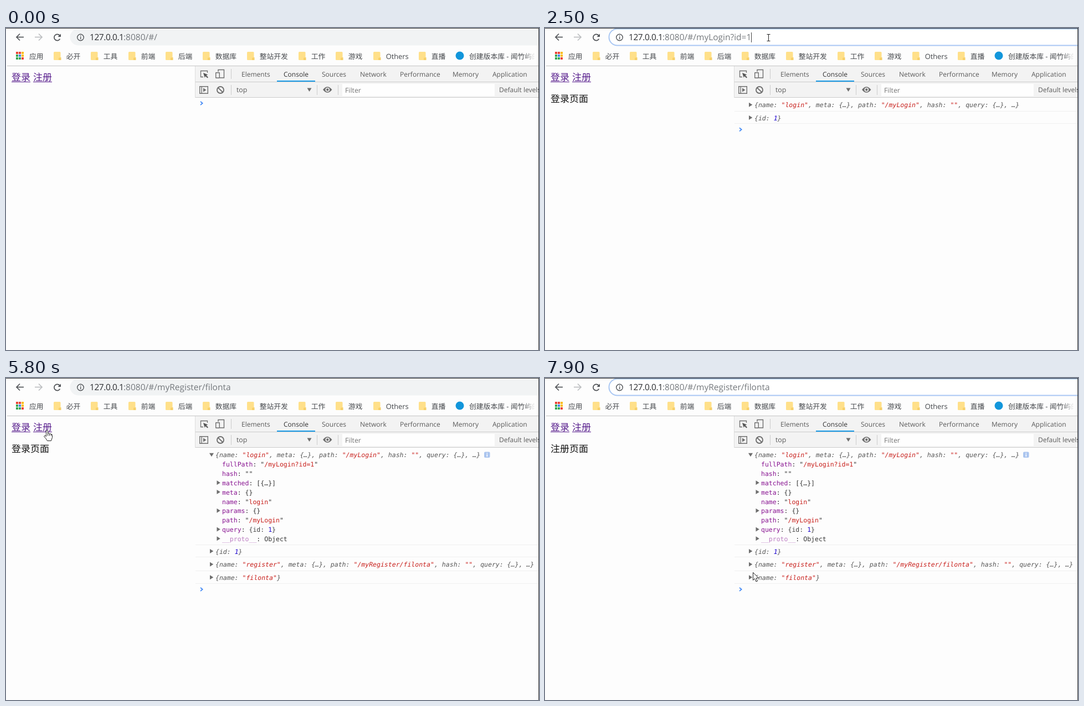
An HTML page with a canvas that plays this animation: 962 by 582 pixels, repeating every 8000 ms.

```html
<!DOCTYPE html>
<html lang="zh">
<head>
<meta charset="utf-8">
<title>Router demo</title>
<style>
html, body { margin: 0; width: 100%; height: 100%; overflow: hidden; background: #fdfdfd; }
canvas { display: block; }
</style>
</head>
<body>
<canvas id="stage" width="962" height="582"></canvas>
<script>
const ctx = document.getElementById('stage').getContext('2d');
const LOOP = 8000, STEP = 100;
const SANS = '"Open Sans", "Noto Sans CJK SC", "Noto Sans CJK", sans-serif';
const CJK = '"Noto Sans CJK SC", "Noto Sans CJK", sans-serif';
const MONO = '"DejaVu Sans Mono", "Noto Sans Mono", monospace';
const CHAR = 6.93;
const USER = 'filonta';
const RED = '#c8201c', BLUE = '#1c00cf', GREY = '#565656', PURPLE = '#881391';

ctx.textRendering = 'geometricPrecision';

function rect(x, y, w, h, color) {
  ctx.fillStyle = color;
  ctx.fillRect(x, y, w, h);
}

// Baselines sit on whole pixels to stay crisp.
function text(str, x, y, size, color, family = SANS, style = '') {
  ctx.font = `${style} ${size}px ${family}`;
  ctx.fillStyle = color;
  ctx.fillText(str, x, Math.round(y));
}

function shape(points, fill, stroke, width = 1) {
  ctx.beginPath();
  points.forEach(([x, y], i) => i ? ctx.lineTo(x, y) : ctx.moveTo(x, y));
  if (fill) {
    ctx.closePath();
    ctx.fillStyle = fill;
    ctx.fill();
  }
  if (stroke) {
    ctx.strokeStyle = stroke;
    ctx.lineWidth = width;
    ctx.stroke();
  }
}

function round(x, y, w, h, r, fill, stroke, width = 1) {
  ctx.beginPath();
  ctx.roundRect(x, y, w, h, r);
  if (fill) { ctx.fillStyle = fill; ctx.fill(); }
  if (stroke) { ctx.strokeStyle = stroke; ctx.lineWidth = width; ctx.stroke(); }
}

function circle(x, y, r, fill, stroke, width = 1, from = 0, to = 7) {
  ctx.beginPath();
  ctx.arc(x, y, r, from, Math.min(to, from + Math.PI * 2));
  if (fill) { ctx.fillStyle = fill; ctx.fill(); }
  if (stroke) { ctx.strokeStyle = stroke; ctx.lineWidth = width; ctx.stroke(); }
}

// ---- pointer path: time, x, y, kind (a arrow, h hand, i text beam) ----
const path = [
  [100, 57, 185, 'a'], [200, 33, 185, 'a'], [300, 22, 152, 'a'], [400, 27, 112, 'a'],
  [500, 28, 90, 'h'], [600, 25, 87, 'h'], [1000, 25, 87, 'h'], [1100, 114, 62, 'a'],
  [1200, 175, 45, 'a'], [1300, 250, 22, 'i'], [1500, 370, 17, 'i'], [1800, 403, 17, 'i'],
  [1900, 403, 17, 'i'], [2300, 274, 17, 'i'], [2400, 274, 17, 'i'], [2500, 403, 17, 'i'],
  [2600, 400, 50, 'a'], [2800, 371, 139, 'a'], [3700, 371, 139, 'a'], [3800, 389, 160, 'a'],
  [3900, 488, 195, 'a'], [4000, 518, 243, 'a'], [4100, 400, 210, 'a'], [4200, 232, 145, 'a'],
  [4300, 25, 82, 'h'], [4400, 28, 84, 'h'], [4600, 90, 88, 'a'], [4800, 137, 80, 'a'],
  [5000, 200, 74, 'a'], [5200, 162, 55, 'a'], [5400, 95, 88, 'a'], [5500, 76, 91, 'h'],
  [5600, 73, 94, 'h'], [5900, 73, 94, 'h'], [6000, 130, 65, 'a'], [6200, 300, 20, 'i'],
  [6400, 411, 16, 'i'], [6600, 411, 16, 'i'], [7100, 274, 16, 'i'], [7300, 274, 16, 'i'],
  [7400, 403, 17, 'i'], [7500, 400, 70, 'a'], [7700, 383, 280, 'a'], [7900, 375, 351, 'a']
];

function pointerAt(t) {
  if (t < path[0][0]) return null;
  let i = path.length - 1;
  while (path[i][0] > t) i--;
  const a = path[i], b = path[i + 1] || a;
  const k = b === a ? 0 : (t - a[0]) / (b[0] - a[0]);
  return { x: Math.round(a[1] + (b[1] - a[1]) * k), y: Math.round(a[2] + (b[2] - a[2]) * k), kind: a[3] };
}

function drawPointer({ x, y, kind }) {
  ctx.save();
  ctx.translate(x + 0.5, y + 0.5);
  if (kind === 'a') {
    shape([[0, 0], [0, 14], [3, 11], [5.5, 16.5], [8, 15.5], [5.6, 10.2], [10, 10], [0, 0]], '#fff', '#222');
  } else if (kind === 'i') {
    ctx.beginPath();
    for (const s of [-1, 1]) {
      ctx.moveTo(-3, 6 * s);
      ctx.lineTo(3, 6 * s);
    }
    ctx.moveTo(0, -6);
    ctx.lineTo(0, 6);
    ctx.strokeStyle = '#222';
    ctx.lineWidth = 1;
    ctx.stroke();
  } else {
    ctx.beginPath();
    ctx.moveTo(-1, 11);
    ctx.lineTo(-1, 1);
    ctx.quadraticCurveTo(0.5, -1.5, 2, 1);
    ctx.lineTo(2, 6);
    ctx.quadraticCurveTo(4, 4, 5, 6.5);
    ctx.quadraticCurveTo(7, 5, 8, 7.5);
    ctx.quadraticCurveTo(10, 6.5, 10, 9);
    ctx.lineTo(10, 13);
    ctx.quadraticCurveTo(9, 16, 8, 19);
    ctx.lineTo(1, 19);
    ctx.quadraticCurveTo(-1, 15, -5, 11);
    ctx.quadraticCurveTo(-4, 8, -1, 11);
    ctx.fillStyle = '#fff';
    ctx.fill();
    for (const px of [2, 5, 8]) {
      ctx.moveTo(px, 6.5);
      ctx.lineTo(px, 10);
    }
    ctx.strokeStyle = '#222';
    ctx.lineWidth = 1;
    ctx.stroke();
  }
  ctx.restore();
}

// ---- browser frame ----
function drawToolbar() {
  rect(0, 0, 962, 68, '#fdfdfd');
  const dark = '#505357', pale = '#bcbec0';
  shape([[32, 16.5], [19, 16.5]], null, dark, 1.7);
  shape([[25, 10.5], [19, 16.5], [25, 22.5]], null, dark, 1.7);
  shape([[52, 16.5], [65, 16.5]], null, pale, 1.7);
  shape([[59, 10.5], [65, 16.5], [59, 22.5]], null, pale, 1.7);
  circle(92.5, 17, 5.6, null, dark, 1.8, 0.5, 5.5);
  shape([[99, 10.5], [99, 16], [93.5, 16]], dark);
}

function drawUrl(t, rest, mouse) {
  const focus = (t >= 1900 && t < 3300) || t >= 6500;
  round(115.5, 1.5, 870, 30, 15, focus ? '#fff' : '#f1f3f4', focus ? '#a9c7f3' : null, 2);
  circle(134.5, 17, 5.8, null, '#505357', 1.4);
  rect(134, 13.5, 1.4, 1.5, '#505357');
  rect(134, 16, 1.4, 4.3, '#505357');
  ctx.letterSpacing = '-0.45px';
  text('127.0.0.1', 151, 22, 15.5, '#2b2d30');
  ctx.letterSpacing = '0px';
  text(rest, 212, 22, 15.5, '#74787c');
  const end = 212 + ctx.measureText(rest).width;
  const selecting = (t >= 2000 && t < 2500) || (t >= 6700 && t < 7400);
  if (selecting) {
    const left = Math.max(273, mouse.x);
    ctx.save();
    ctx.beginPath();
    ctx.rect(left, 6, end - left, 21);
    ctx.clip();
    rect(left, 6, end - left, 21, '#3390ff');
    text(rest, 212, 22, 15.5, '#fff');
    ctx.restore();
  } else if (focus) {
    const click = t >= 7400 ? 7400 : t >= 6500 ? 6500 : t >= 2500 ? 2500 : 1900;
    if ((t - click) % 1000 < 500) rect(Math.round(end), 8, 1, 18, '#444');
  }
}

const folders = [
  [86, '必开'], [153, '工具'], [221, '前端'], [288, '后端'], [355, '数据库'],
  [435, '整站开发'], [528, '工作'], [595, '游戏'], [663, 'Others'], [745, '直播']
];

function drawBookmarks() {
  const dots = ['#ea4335', '#ea4335', '#fbbc05', '#34a853', '#4285f4', '#fbbc05', '#34a853', '#34a853', '#ea4335'];
  dots.forEach((c, i) => rect(18 + (i % 3) * 5, 43 + Math.floor(i / 3) * 5, 4, 4, c));
  text('应用', 42, 56, 12.8, '#45484c', CJK);
  for (const [x, name] of folders) {
    round(x, 43, 12.5, 15, 1.5, '#ffe08a');
    shape([[x + 9, 58], [x + 9, 54], [x + 13.5, 53], [x + 13.5, 58]], '#f7d068');
    text(name, x + 22.7, 56, 12.8, '#45484c');
  }
  circle(819, 50, 7.5, '#1296db');
  text('创建版本库 - 闻竹屿的', 836, 56, 12.8, '#45484c');
  const fade = ctx.createLinearGradient(934, 0, 955, 0);
  fade.addColorStop(0, 'rgba(253,253,253,0)');
  fade.addColorStop(1, '#fdfdfd');
  rect(934, 40, 28, 22, fade);
  rect(2, 68, 960, 1, '#c4c4c4');
}

function drawLink(str, x) {
  text(str, x, 95, 17, '#551a8b', CJK);
  rect(x, 97, 34, 1, '#551a8b');
}

// ---- developer tools ----
const tabs = [
  [425, 'Elements'], [501, 'Console'], [570, 'Sources'], [639, 'Network'],
  [711, 'Performance'], [806, 'Memory'], [878, 'Application']
];

function drawTools() {
  const icon = '#6e6e6e';
  rect(341, 69, 621, 57, '#f3f3f3');
  rect(341, 97, 621, 1, '#cccccc');
  rect(341, 125, 621, 1, '#cccccc');
  rect(341, 69, 1, 57, '#dddddd');

  shape([[356, 88.5], [351.5, 88.5], [351.5, 77.5], [363.5, 77.5], [363.5, 81]], null, icon, 1.3);
  shape([[356, 81], [364.5, 84.5], [361.5, 85.5], [365, 89], [363.5, 90.5], [360, 87], [358.8, 90]], '#555');
  shape([[383, 79], [383, 75.5], [393.5, 75.5], [393.5, 90], [386, 90]], null, icon, 1.4);
  round(378.7, 80.7, 6.6, 9.6, 0.5, '#f3f3f3', icon, 1.4);
  for (const [x, y] of [[406, 74], [406, 103], [561, 103], [599, 103]]) rect(x, y, 1, 18, '#cccccc');

  for (const [x, name] of tabs) text(name, x, 88, 12, name === 'Console' ? '#333' : '#5a5a5a');
  rect(489, 95, 69, 2, '#1a9be8');

  round(349.7, 105.7, 14.6, 12.6, 0, null, icon, 1.4);
  rect(352.5, 106, 1.3, 12, icon);
  shape([[356, 108.5], [361.5, 112], [356, 115.5]], icon);
  circle(387, 112, 6, null, icon, 1.9);
  shape([[382.8, 107.8], [391.2, 116.2]], null, icon, 1.9);
  text('top', 416, 116, 12.3, '#5a5a5a');
  shape([[543.5, 108.5], [551.5, 108.5], [547.5, 115]], icon);

  ctx.beginPath();
  ctx.moveTo(572, 111.5);
  ctx.quadraticCurveTo(580, 101, 588.5, 111.5);
  ctx.quadraticCurveTo(580, 122, 572, 111.5);
  ctx.fillStyle = icon;
  ctx.fill();
  circle(580.3, 111.5, 3.8, '#f3f3f3');
  circle(580.3, 111.5, 2.2, icon);

  rect(607, 101, 275, 22, '#fefefe');
  text('Filter', 612, 117, 12.3, '#757575');
  text('Default levels', 890, 116, 12, '#5a5a5a');
}

function mono(parts, x, y, style) {
  for (const [str, color] of parts) {
    text(str, x, y, 11.5, color, MONO, style);
    x += str.length * CHAR;
  }
}

function triangle(x, y, open) {
  shape(open
    ? [[x - 1, y - 3], [x + 7, y - 3], [x + 3, y + 3.5]]
    : [[x, y - 4], [x + 6.3, y], [x, y + 4]], '#6e6e6e');
}

function preview(str, y, open) {
  triangle(368, y - 0.5, open);
  const parts = str.match(/"[^"]*"|\d+|[^"\d]+/g)
    .map(s => [s, s[0] === '"' ? RED : /\d/.test(s) ? BLUE : GREY]);
  mono(parts, 378, y + 4, 'italic');
}

const rule = y => rect(342, y, 619, 1, '#f0f0f0');

const routeLine = (name, url) =>
  `{name: "${name}", meta: {…}, path: "${url}", hash: "", query: {…}, …}`;

const props = [
  ['fullPath', '"/myLogin?id=1"'], ['hash', '""'], ['matched', '[{…}]', true], ['meta', '{}', true],
  ['name', '"login"'], ['params', '{}', true], ['path', '"/myLogin"'], ['query', '{id: 1}', true],
  ['__proto__', 'Object', true]
];

function drawProps() {
  props.forEach(([key, value, nested], i) => {
    const y = 156.2 + i * 16.85;
    if (nested) triangle(380.5, y - 0.7);
    const parts = [[key, key[0] === '_' ? '#bd7fc3' : PURPLE], [': ', '#333']];
    if (value[0] === '"') parts.push(['"', '#333'], [value.slice(1, -1), RED], ['"', '#333']);
    else if (key === 'query') parts.push(['{id: ', '#444'], ['1', BLUE], ['}', '#444']);
    else parts.push([value, '#333']);
    mono(parts, 390, y + 4);
  });
}

function drawConsole(t) {
  let prompt = 136;
  if (t >= 1000) {
    const open = t >= 3300;
    preview(routeLine('login', '/myLogin'), 139.3, open);
    if (open) {
      drawProps();
      round(863, 133.5, 10.5, 10.5, 2, '#abc5ef');
      rect(867.5, 135.5, 1.6, 1.6, '#fff');
      rect(867.5, 138, 1.6, 4.2, '#fff');
    }
    const y = open ? 313.5 : 162.5;
    rule(open ? 301 : 150);
    preview('{id: 1}', y);
    rule(open ? 323 : 172);
    prompt = open ? 335 : 183.5;
  }
  if (t >= 5800) {
    preview(routeLine('register', '/myRegister/' + USER), 337.3);
    rule(348);
    preview(`{name: "${USER}"}`, 360.7);
    rule(371);
    prompt = 382;
  }
  shape([[351, prompt - 3.2], [354.7, prompt], [351, prompt + 3.2]], null, '#3f87f5', 1.7);
  const caret = t >= 3300 && t < 5800 && (t < 3400 || (t - 3400) % 1000 < 500);
  if (caret) rect(366, 328, 1, 15, '#222');
}

function draw(t) {
  const mouse = pointerAt(t);
  const url = t >= 5800 ? '/myRegister/' + USER : t >= 1000 ? '/myLogin?id=1' : '/';
  rect(0, 0, 962, 582, '#fdfdfd');
  drawToolbar();
  drawUrl(t, ':8080/#' + url, mouse);
  drawBookmarks();
  drawLink('登录', 10);
  drawLink('注册', 49);
  if (t >= 1000) text(t >= 5900 ? '注册页面' : '登录页面', 10, 134, 17, '#111', CJK);
  drawTools();
  drawConsole(t);
  rect(0, 0, 962, 1, '#3a3a3a');
  rect(961, 0, 1, 582, '#3a3a3a');
  if (mouse) drawPointer(mouse);
}

function frame() {
  const t = performance.now() % LOOP;
  draw(Math.floor(t / STEP) * STEP);
  requestAnimationFrame(frame);
}
frame();
</script>
</body>
</html>
```
